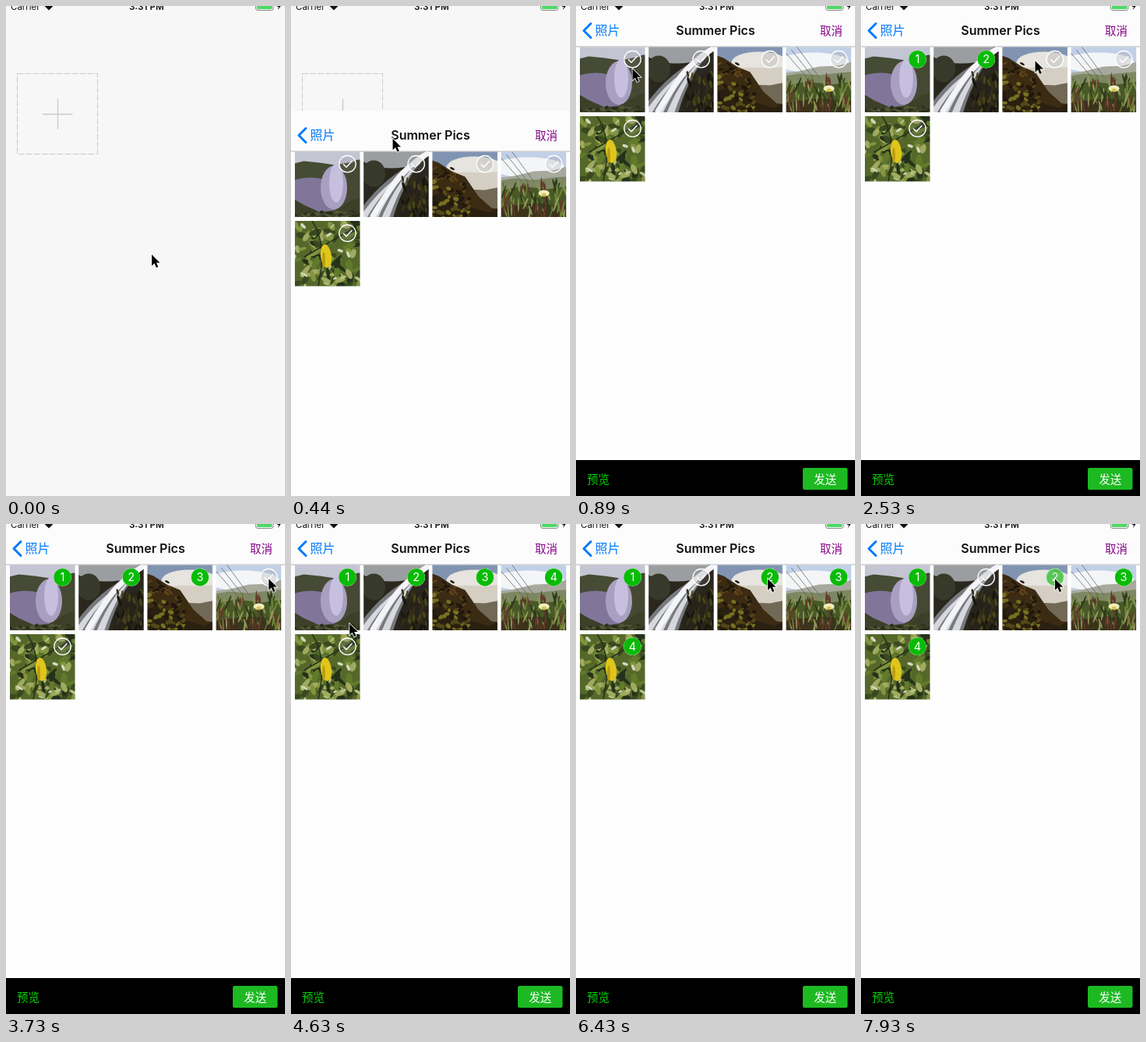
An HTML page for the animation above (8000 ms loop, 358 px wide and 627 px high).

```html
<!DOCTYPE html>
<html lang="en">
<head>
<meta charset="utf-8">
<title>Photo picker</title>
<style>
html, body { margin: 0; width: 100%; height: 100%; overflow: hidden; background: #f7f7f7; }
svg { display: block; }
text { font-family: Inter, "Noto Sans CJK SC", "Noto Sans CJK", sans-serif; }
.mid { text-anchor: middle; }
.line { fill: none; stroke-linecap: round; stroke-linejoin: round; }
</style>
</head>
<body>
<svg width="358" height="627" viewBox="0 0 358 627">
  <defs>
    <clipPath id="cell"><rect width="83.5" height="83.5"/></clipPath>
    <filter id="soft"><feGaussianBlur stdDeviation=".7"/></filter>
  </defs>

  <rect width="358" height="627" fill="#f7f7f7"/>
  <g fill="none" stroke="#c9c9c9">
    <rect x="14.5" y="86.5" width="103" height="103" stroke-dasharray="8 2"/>
    <path d="M47 138.5H85.5M66.5 119V157.5" stroke-width="1.3"/>
  </g>

  <g id="sheet">
    <rect width="358" height="640" fill="#fefefe"/>
    <rect width="358" height="52" fill="#fcfcfc"/>
    <path d="M0 52H358" stroke="#b4b4b4"/>
    <path class="line" d="M19 22.500L10 31.500L19 40.500" stroke="#007aff" stroke-width="3"/>
    <text x="24.500" y="37" font-size="16" fill="#007aff">照片</text>
    <text class="mid" x="179" y="37" font-size="16" font-weight="600" fill="#111">Summer Pics</text>
    <text x="313" y="36.500" font-size="14.500" fill="#850085">取消</text>
    <g id="photos"></g>
    <rect y="581" width="358" height="60"/>
    <text x="14" y="610.500" font-size="14.500" fill="#00d500">预览</text>
    <rect x="291" y="591" width="57.500" height="28" rx="2.500" fill="#1db922"/>
    <text class="mid" x="319.800" y="610.500" font-size="14.500" fill="#fff">发送</text>
  </g>

  <g fill="#111">
    <text x="6" y="5" font-size="11.500">Carrier</text>
    <path d="M49.500 0Q55 -4 60.500 0L55 5.500Z"/>
    <text class="mid" x="180.300" y="5" font-size="11.700" font-weight="600">3:31 PM</text>
    <rect x="320.500" y="-6" width="22.500" height="11.500" rx="2.500" fill="none" stroke="#888"/>
    <rect x="322" y="-5" width="19.500" height="9" rx="1" fill="#4cd964"/>
    <path d="M351.500 -4L347.500 1H350L349 5L353 -.5H350.500Z"/>
  </g>

  <path id="cursor" d="M0 0V14.500L3.400 11.300L5.800 16.800L8.300 15.700L5.900 10.400H10.500Z"
    stroke="#fff" stroke-width="1.600" paint-order="stroke"/>
</svg>

<script>
const $ = id => document.getElementById(id);
const repeat = (n, draw) => Array.from({ length: n }, (_, i) => draw(i)).join("");

let seed = 7;
const rand = (a, b) => {
  seed = seed * 16807 % 2147483647;
  return a + (b - a) * seed / 2147483647;
};

const fill = color => `<rect x="-9" y="-9" width="102" height="102" fill="${color}"/>`;
const blob = (color, x, y, rx, ry, turn = 0) =>
  `<ellipse rx="${rx}" ry="${ry}" fill="${color}" transform="translate(${x} ${y}) rotate(${turn})"/>`;
const curve = (color, width, d) => `<path class="line" d="${d}" stroke="${color}" stroke-width="${width}"/>`;

// Ground below evenly spaced heights
const hill = (color, ...ys) => `<path fill="${color}" d="M-9 93L${
  ys.map((y, i) => `${-9 + 102 * i / (ys.length - 1)} ${y}`).join("L")}L93 93Z"/>`;

// Random leaves of size rx, ry with centres in x0..x1, y0..y1
const scatter = (n, colors, x0, x1, y0, y1, rx, ry, turn) => repeat(n, i =>
  blob(colors[i % colors.length], rand(x0, x1), rand(y0, y1), rand(rx / 2, rx), rand(ry / 2, ry), rand(-turn, turn)));

const scenes = [
  // Lavender waterfall between grassy hills
  () => fill("#c3c5d2") + hill("#454b34", 17, 12, 14, 17, 13, 11) +
    blob("#81769a", 20, 58, 42, 25) + blob("#a99fc0", 50, 46, 17, 28) + blob("#c6bfdd", 53, 40, 9, 25) +
    blob("#454832", 82, 42, 15, 32) + hill("#3d4028", 56, 68, 77, 75, 62, 56) +
    scatter(30, ["#515936", "#292e1b"], 0, 84, 76, 84, 5, 2, 40),
  // Fanning white torrent past dark rock
  () => fill("#2a271e") + blob("#9b9ea0", 36, 4, 42, 17) + blob("#37392a", 13, 28, 15, 17) +
    repeat(10, i => curve(i % 3 ? "#d6d8de" : "#777a7d", 5,
      `M${84 - i * 2} ${i * 2}Q${52 - i * 3} ${25 + i} ${34 - i * 5} 88`)) +
    curve("#f4f4f8", 7, "M82 2Q52 22 38 42T12 82") +
    blob("#28231a", 72, 64, 24, 34, 35) +
    scatter(40, ["#494719", "#18160f", "#373019"], 50, 84, 34, 84, 2, 7, 30),
  // Brown cliffs and a pale fall
  () => fill("#8094b2") + blob("#e6e4df", 54, 20, 36, 14) + hill("#d5cfc3", 30, 28, 26, 27, 25) +
    hill("#716956", 50, 50, 48, 49, 44) + hill("#3c2b13", 8, 14, 25, 32, 57, 72, 74) +
    hill("#292011", 58, 53, 60, 72, 78, 68) +
    scatter(60, ["#777021", "#21180c", "#534818"], 0, 48, 38, 84, 4, 3, 50) +
    scatter(16, ["#1d170c", "#5f431a"], 0, 34, 20, 38, 5, 2, 50),
  // Dune grass with one pale flower
  () => fill("#c1d0e7") + blob("#f3f5f7", 35, 20, 46, 13) + hill("#a7a99d", 34, 31, 25, 24, 16) +
    hill("#7e8763", 38, 34, 36, 33, 31) + hill("#485927", 52, 44, 48, 43) + hill("#3e321d", 72, 66, 70) +
    scatter(90, ["#6d8538", "#2e3b1a", "#8d9657", "#63392a"], 0, 84, 42, 86, 1.4, 11, 25) +
    repeat(3, i => curve("#525955", .7, `M${i * 7} ${8 - i * 4}L${26 + i * 8} 38`)) +
    blob("#f0eebf", 55, 53, 7, 4) + blob("#d6c443", 55, 55, 3, 2),
  // Foliage with a yellow leaf
  () => fill("#55682a") +
    scatter(90, ["#83943f", "#25311a", "#a0aa60", "#617a2b", "#39491f"], 0, 84, 0, 84, 4, 10, 80) +
    scatter(16, ["#d3d7bd", "#b4c081"], 0, 84, 0, 84, 2, 5, 80) +
    curve("#26311b", 1.5, "M22 0Q42 28 30 84M78 8L12 46") +
    blob("#dfc51c", 40, 45, 7, 15, -8) + blob("#b99d12", 37, 50, 2, 10)
];

const cells = scenes.map((_, i) => [5 + i % 4 * 88.2, i < 4 ? 52.5 : 141]);
const BADGE = [67.5, 15.7];
$("photos").innerHTML = scenes.map((draw, i) => `
  <g transform="translate(${cells[i]})">
    <g clip-path="url(#cell)"><g filter="url(#soft)">${draw()}</g></g>
    <g class="line" stroke="#fff" transform="translate(${BADGE})">
      <circle r="10.700" fill="#8883" stroke-width="1.300"/><path d="M-5 .5L-1.500 4L5.500 -3.500" stroke-width="1.500"/>
    </g>
    <g class="badge" transform="translate(${BADGE})">
      <circle r="11.200" fill="#09bb07"/><text class="mid" y="5.200" font-size="14.500" fill="#fff"></text>
    </g>
  </g>`).join("");
const badges = [...document.querySelectorAll(".badge")];

// Each step: the cursor travels to a point or a photo's badge, waits, then taps
const steps = [
  { at: [98, 165], travel: 290, tap: 350 },
  { at: [134, 180], travel: 240, tap: 590 },
  { cell: 0, travel: 370, tap: 1330 },
  { cell: 1, travel: 750, tap: 2380 },
  { cell: 2, travel: 680, tap: 3430 },
  { cell: 3, travel: 300, tap: 4180 },
  { cell: 4, travel: 750, tap: 5230 },
  { cell: 1, travel: 300, tap: 6130 },
  { cell: 2, travel: 600, tap: 7930 }
];
const FADE = 150;

const goal = ({ at, cell }) => at ?? [cells[cell][0] + BADGE[0], cells[cell][1] + BADGE[1] + 2];
const swift = u => 1 - (1 - u) ** 5;
const smooth = u => u * u * (3 - 2 * u);

function pointer(t) {
  let x = 187, y = 318, leave = 0;
  for (const step of steps) {
    if (t <= leave) break;
    const u = Math.min(1, (t - leave) / step.travel), [gx, gy] = goal(step);
    x += (gx - x) * swift(u);
    y += (gy - y) * smooth(u);
    leave = step.tap;
  }
  return [x, y];
}

// Critically damped spring
function sheetTop(t) {
  const s = Math.max(0, t - 250) * 0.0153;
  return Math.round(627 * (1 + s) * Math.exp(-s));
}

// The screen refreshes every 150 ms
function tick(t) {
  const lag = t < 1030 ? 10 : 20;
  return Math.max(0, Math.floor((t + lag) / 150) * 150 - lag);
}

function render(now) {
  const t = tick(now % 8000);
  $("sheet").setAttribute("transform", `translate(0 ${sheetTop(t)})`);
  $("cursor").setAttribute("transform", `translate(${pointer(t)})`);
  let count = 0;
  badges.forEach((badge, i) => {
    const taps = steps.filter(s => s.cell === i && s.tap <= t);
    const on = taps.length % 2 === 1;
    const fading = !on && taps.length > 0 && t < taps.at(-1).tap + FADE;
    if (on || fading) count++;
    badge.style.opacity = on ? 1 : fading ? 0.6 : 0;
    badge.lastElementChild.textContent = count;
  });
}

let start;
function frame(now) {
  start ??= now;
  render(now - start);
  requestAnimationFrame(frame);
}
render(0);
requestAnimationFrame(frame);
</script>
</body>
</html>
```
